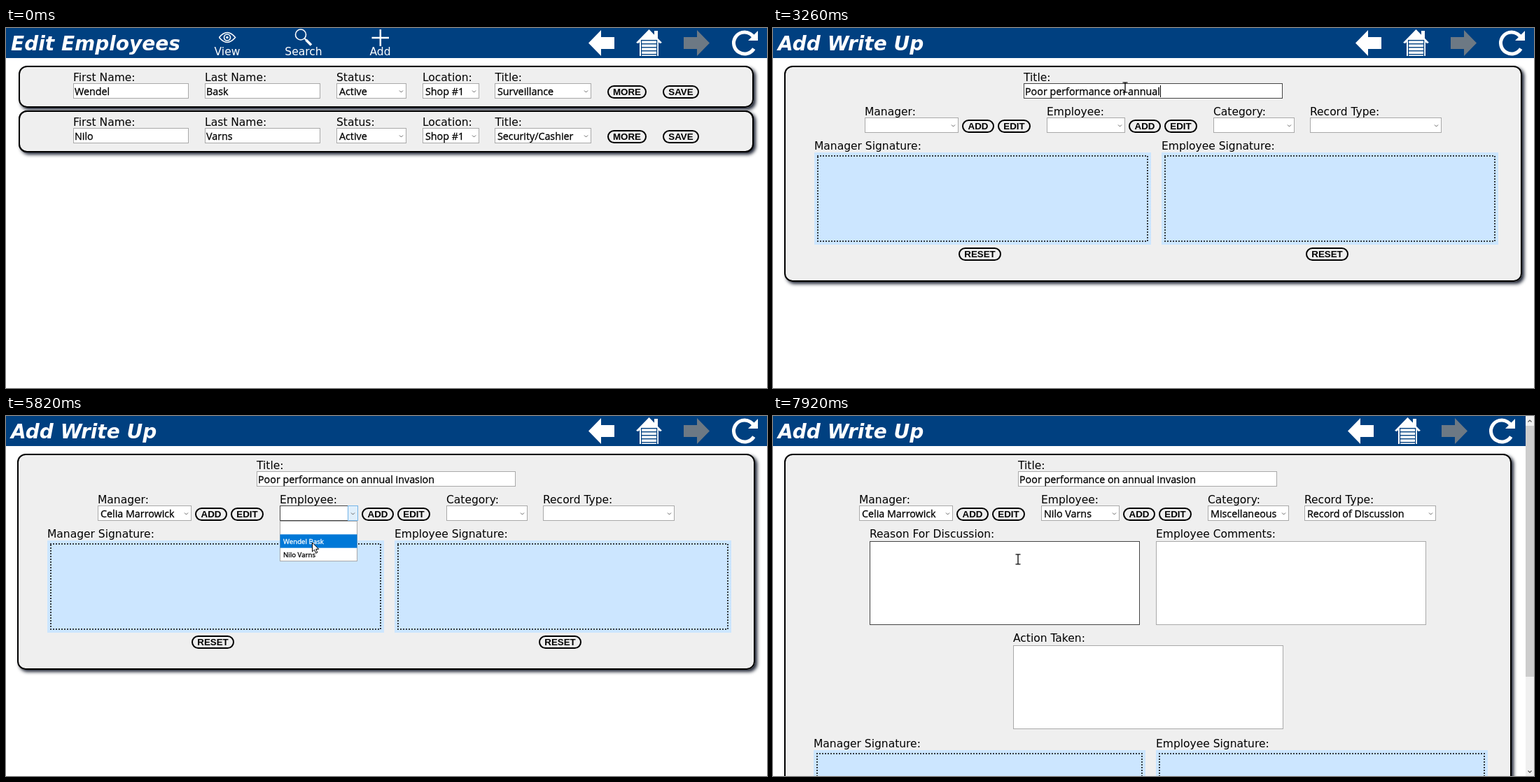
An HTML page with a canvas that plays this animation: 1087x515 px, repeating every 8 s.

```html
<!DOCTYPE html>
<html lang="en">
<head>
<meta charset="utf-8">
<title>Add Write Up</title>
<style>
html, body { margin: 0; width: 1087px; height: 515px; overflow: hidden; background: #fff; }
canvas { display: block; }
</style>
</head>
<body>
<canvas id="stage" width="1087" height="515"></canvas>
<script>
const g = document.getElementById('stage').getContext('2d');
const LOOP = 8000, NAVY = '#004080', GREY = '#efefef';
const LABEL = '15.5px "DejaVu Sans", Verdana, sans-serif';
const HEAD = 'italic bold 28px "DejaVu Sans", Verdana, sans-serif';
const VALUE = '14.3px "Open Sans", "Noto Sans", sans-serif';
const ITEM = '9.7px "Open Sans", "Noto Sans", sans-serif';
const BUTTON = 'bold 13.33px "Liberation Sans", Arial, sans-serif';

const SENTENCE = 'Poor performance on annual invasion';
const MANAGER = 'Celia Marrowick', STAFF = 'Nilo Varns';

// x, width, label, options, chosen option, opening and closing time
const MENUS = [
  { x: 131, w: 134, label: 'Manager:', options: ['', MANAGER], pick: 1, open: 4400, close: 5020 },
  { x: 391, w: 112, label: 'Employee:', options: ['', 'Wendel Bask', STAFF], pick: 2, open: 5420, close: 6020 },
  { x: 629, w: 116, label: 'Category:', options: ['', 'Attendance', 'Variance', 'Miscellaneous'],
    pick: 3, open: 6420, close: 6920 },
  { x: 767, w: 188, label: 'Record Type:', pick: 1, open: 7320, close: 7820,
    options: ['', 'Record of Discussion', 'First Written Warning', 'Second Written Warning', 'Dismissal'] }
];

// time, x, y of the pointer
const PATH = [
  [100, 640, 120], [500, 532, 18], [900, 527, 9], [1220, 503, 85], [3680, 503, 85],
  [3900, 455, 56], [4200, 265, 86], [4400, 255, 140], [4700, 246, 152], [4900, 240, 176],
  [4920, 241, 181], [5020, 253, 172], [5420, 450, 138], [5620, 440, 160], [5920, 436, 192],
  [6020, 470, 182], [6420, 690, 138], [6620, 662, 187], [6820, 658, 214], [7020, 730, 165],
  [7320, 812, 138], [7420, 812, 157], [7720, 815, 182], [7820, 700, 190], [7920, 350, 205]
];
// time, typed letters
const TYPING = [[1320, 0], [1640, 3], [2540, 13], [3240, 26], [3260, 26], [3380, 28], [3800, 35]];

let mouse = null;

const SHORT = [900, 1620, 3240, 3260, 4080, 4900];
function snap(t) {
  let start = 0;
  for (;;) {
    const next = start + (SHORT.includes(start) ? 20 : 100);
    if (next > t) return start;
    start = next;
  }
}

function along(keys, t) {
  if (t <= keys[0][0]) return keys[0].slice(1);
  const i = keys.findIndex(k => k[0] > t);
  if (i < 0) return keys[keys.length - 1].slice(1);
  const a = keys[i - 1], b = keys[i], p = (t - a[0]) / (b[0] - a[0]);
  return a.slice(1).map((v, n) => v + (b[n + 1] - v) * p);
}

const over = (x, y, w, h) => mouse && mouse[0] >= x && mouse[0] < x + w && mouse[1] >= y && mouse[1] < y + h;

function rect(x, y, w, h, fill) {
  g.fillStyle = fill;
  g.fillRect(x, y, w, h);
}

function text(s, x, y, font = LABEL, color = '#000', align = 'left') {
  g.font = font;
  g.fillStyle = color;
  g.textAlign = align;
  g.fillText(s, x, y);
}

// Form values are a touch heavier than the regular face
function value(s, x, y, font = VALUE, color = '#000') {
  text(s, x, y, font, color);
  g.strokeStyle = color;
  g.lineWidth = .3;
  g.strokeText(s, x, y);
}

function line(points, color, width) {
  g.beginPath();
  points.forEach(p => g.lineTo(...p));
  g.strokeStyle = color;
  g.lineWidth = width;
  g.stroke();
}

function shape(points, color) {
  g.beginPath();
  points.forEach(p => g.lineTo(...p));
  g.fillStyle = color;
  g.fill();
}

function frame(x, y, w, h, dark, fill = '#fff') {
  rect(x, y, w, h, fill);
  g.strokeStyle = dark ? '#444' : '#a9a9a9';
  g.lineWidth = 1;
  g.strokeRect(x + .5, y + .5, w - 1, h - 1);
}

function rounded(x, y, w, h, r) {
  g.beginPath();
  g.roundRect(x + 1, y + 1, w - 2, h - 2, r);
  g.fillStyle = GREY;
  g.fill();
  g.strokeStyle = '#000';
  g.lineWidth = 2;
  g.stroke();
}

function card(x, y, w, h) {
  g.save();
  g.shadowColor = '#1a2030';
  g.shadowBlur = 5;
  g.shadowOffsetX = g.shadowOffsetY = 3;
  g.beginPath();
  g.roundRect(x, y, w, h, 12);
  g.fill();
  g.restore();
  rounded(x, y, w, h, 11);
}

function button(s, x, y, w) {
  rounded(x, y, w, 19, 8.5);
  text(s, x + w / 2, y + 14, BUTTON, '#000', 'center');
}

function input(x, y, w, s, h = 22) {
  frame(x, y, w, h, over(x, y, w, h));
  value(s, x + 2, y + 17);
}

function select(x, y, w, s, open) {
  const hot = open || over(x, y, w, 22);
  frame(x, y, w, 22, hot);
  if (hot) {
    frame(x + w - 15, y, 15, 22, false, '#e0effb');
    g.strokeStyle = '#74b4e8';
    g.strokeRect(x + w - 14.5, y + .5, 14, 21);
  }
  const cx = x + w - 7.5, cy = y + 10.5;
  line([[cx - 2.5, cy], [cx, cy + 2.5], [cx + 2.5, cy]], '#666', 1);
  value(s, x + 4, y + 17);
}

function dropdown(m) {
  const row = 19.35, h = Math.round(m.options.length * row);
  const hot = Math.min(m.options.length - 1, Math.max(0, Math.floor((mouse[1] - 150) / row)));
  frame(m.x, 150, m.w - 1, h);
  rect(m.x + .5, 150 + hot * row, m.w - 2, row, '#0078d7');
  m.options.forEach((s, i) => value(s, m.x + 5, 183 + (i - 1) * row, ITEM, i == hot ? '#fff' : '#000'));
}

function pad(label, x, y, w) {
  text(label, x, y - 4);
  rect(x, y, w, 132, '#cce6ff');
  g.save();
  g.lineCap = 'round';
  g.setLineDash([0, 4]);
  g.strokeStyle = '#000';
  g.lineWidth = 2;
  g.strokeRect(x + 5, y + 5, w - 10, 122);
  g.restore();
  button('RESET', Math.floor(x + w / 2 - 34.5), y + 136, 61);
}

function arrow(x, dir, color) {
  shape([[0, 21.5], [18, 3], [18, 13], [37, 13], [37, 30], [18, 30], [18, 40]]
    .map(([a, b]) => [dir > 0 ? x + 37 - a : x + a, b]), color);
}

function house(x) {
  rect(x + 26, 4, 5, 12, '#fff');
  shape([[x, 21], [x + 18.5, 2], [x + 37, 21], [x + 34, 22], [x + 18.5, 8], [x + 3, 22]], '#fff');
  shape([[x + 5, 40], [x + 5, 20], [x + 18.5, 7], [x + 32, 20], [x + 32, 40]], '#fff');
  for (let y = 17; y < 40; y += 5) rect(x + 8, y, 21, 1.4, NAVY);
  rect(x + 7, 17, 1.2, 23, NAVY);
  rect(x + 29, 17, 1.2, 23, NAVY);
}

function reload(x) {
  g.beginPath();
  g.arc(x + 18, 21.5, 15.5, .55, -.6);
  g.strokeStyle = '#fff';
  g.lineWidth = 5;
  g.stroke();
  shape([[x + 37, 4], [x + 37, 18], [x + 23, 18]], '#fff');
}

function header(title, width, narrow) {
  const at = k => 832 + 68 * k - (narrow ? 11 + k : 0);
  rect(0, 0, width, 43, NAVY);
  text(title, 7, 32, HEAD, '#fff');
  arrow(at(0), -1, '#fff');
  house(at(1));
  arrow(at(2), 1, '#6d7984');
  reload(at(3) + 1);
}

function toolbar() {
  [['View', 316], ['Search', 425], ['Add', 534.5]].forEach(([s, x]) => text(s, x, 39, LABEL, '#fff', 'center'));
  g.strokeStyle = '#fff';
  g.lineWidth = 1.6;
  g.beginPath();
  g.moveTo(304.5, 13.5);
  g.quadraticCurveTo(316, -.5, 327.5, 13.5);
  g.quadraticCurveTo(316, 27.5, 304.5, 13.5);
  g.moveTo(320.5, 13.5);
  g.arc(316, 13.5, 4.5, 0, 7);
  g.moveTo(428.5, 9.5);
  g.arc(421, 9.5, 7.5, 0, 7);
  g.stroke();
  g.beginPath();
  g.arc(316, 13.5, 1.7, 0, 7);
  g.fillStyle = '#fff';
  g.fill();
  line([[426.5, 15], [429, 17.5]], '#fff', 2);
  line([[428.5, 17], [436, 24.5]], '#fff', 3.6);
  line([[522.5, 14], [547, 14]], '#fff', 2.5);
  line([[534.8, 2], [534.8, 26]], '#fff', 2.5);
}

function employee(y, first, last, job) {
  card(18, y, 1050, 60);
  [['First Name:', 96], ['Last Name:', 284], ['Status:', 472], ['Location:', 595], ['Title:', 698.5]]
    .forEach(([s, x]) => text(s, x, y + 21.5));
  input(96, y + 25, 165, first);
  input(284, y + 25, 165, last);
  select(472, y + 25, 100, 'Active');
  select(595, y + 25, 81, 'Shop #1');
  select(698, y + 25, 138, job);
  button('MORE', 859, y + 28, 56);
  button('SAVE', 938, y + 28, 52);
}

function area(label, x, y) {
  text(label, x, y - 5);
  input(x, y, 386, '', 120);
}

function scrollbar() {
  rect(1075, 0, 12, 515, '#f0f0f0');
  rect(1075, 14, 12, 359, '#cdcdcd');
  line([[1078.5, 8.5], [1081, 6], [1083.5, 8.5]], '#505050', 1.2);
  line([[1078.5, 507.5], [1081, 510], [1083.5, 507.5]], '#505050', 1.2);
}

function writeUp(t) {
  const wide = t >= 7820, dx = wide ? -8 : 0;
  header('Add Write Up', wide ? 1075 : 1087, wide);
  card(16, 54, wide ? 1039 : 1054, wide ? 540 : 309);

  const typed = SENTENCE.slice(0, Math.floor(along(TYPING, t)[0] + .01));
  text('Title:', 358 + dx, 75.5);
  input(358 + dx, 79, 370, typed);
  if (t >= 1320 && t < 4300) {
    g.font = VALUE;
    rect(Math.round(360 + g.measureText(typed).width), 82, 1, 17, '#000');
  }

  MENUS.forEach((m, i) => {
    const x = m.x + dx;
    text(m.label, x, 125);
    select(x, 128, m.w, t >= m.close ? m.options[m.pick] : '', t >= m.open && t < m.close);
    if (i < 2) {
      button('ADD', x + m.w + 5, 131, 46);
      button('EDIT', x + m.w + 56, 131, 47);
    }
  });

  if (wide) {
    area('Reason For Discussion:', 138, 179);
    area('Employee Comments:', 547, 179);
    area('Action Taken:', 343, 328);
    pad('Manager Signature:', 58, 478, 474);
    pad('Employee Signature:', 547, 478, 474);
    scrollbar();
  } else {
    pad('Manager Signature:', 59, 178, 481);
    pad('Employee Signature:', 555, 178, 481);
  }
  const active = MENUS.find(m => t >= m.open && t < m.close);
  if (active) dropdown(active);
}

function pointer(t) {
  const [x, y] = mouse.map(Math.round);
  const writing = t >= 600 && (t >= 7820 ? over(138, 179, 386, 120) || over(547, 179, 386, 120) : over(358, 79, 370, 22));
  if (writing) {
    line([[x, y - 7], [x, y + 7]], '#000', 1.3);
    for (const d of [-7, 7]) line([[x - 3.5, y + d], [x + 3.5, y + d]], '#000', 1.2);
    return;
  }
  const tip = [[0, 0], [0, 13], [3, 10.3], [5.2, 15.3], [7.3, 14.3], [5.2, 9.6], [9.2, 9.4], [0, 0]]
    .map(([a, b]) => [x + a + .5, y + b]);
  shape(tip, '#fff');
  line(tip, '#000', 1);
}

function draw(now) {
  const t = snap(now % LOOP);
  mouse = t >= 100 ? along(PATH, t) : null;
  rect(0, 0, 1087, 515, '#fff');
  if (t < 600) {
    header('Edit Employees', 1087);
    toolbar();
    employee(54, 'Wendel', 'Bask', 'Surveillance');
    employee(118, 'Nilo', 'Varns', 'Security/Cashier');
  } else {
    writeUp(t);
  }
  if (mouse) pointer(t);
}

let begin;
function tick(now) {
  begin ??= now;
  draw(now - begin);
  requestAnimationFrame(tick);
}
requestAnimationFrame(tick);
</script>
</body>
</html>
```
